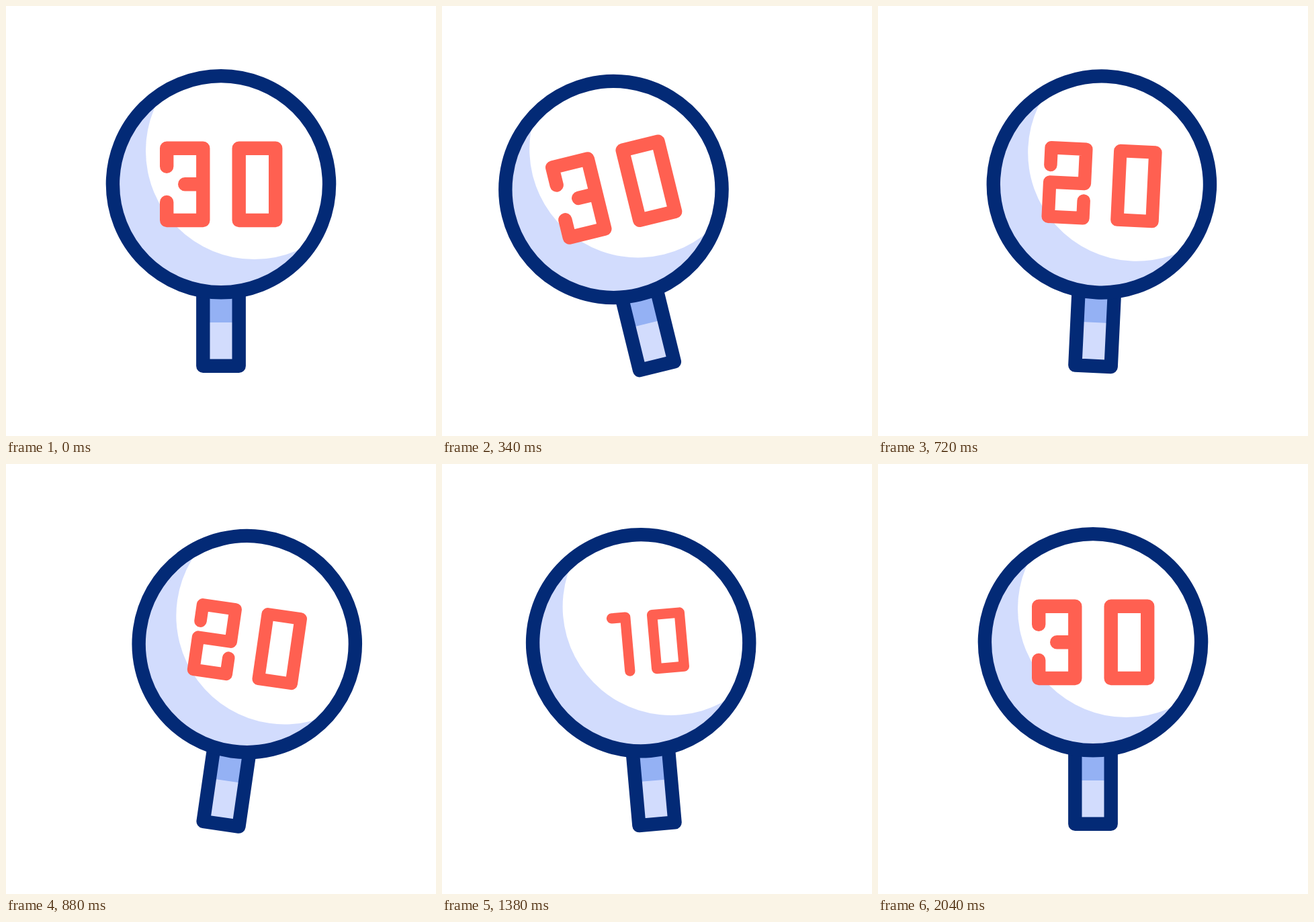
Write an HTML page that moves like this. It is 640 by 640 pixels and loops after 3.02 s.

```html
<!DOCTYPE html>
<html lang="en">
<head>
<meta charset="utf-8">
<title>Countdown paddle</title>
<style>
  html, body { margin: 0; height: 100%; overflow: hidden; background: #fff; }
  svg { display: block; width: 100%; height: 100%; }
  .line { fill: none; stroke-width: 20.4; stroke-linecap: round; stroke-linejoin: round; }
</style>
</head>
<body>
<svg viewBox="0 0 640 640">
  <clipPath id="disc"><circle cx="320" cy="265.2" r="161"/></clipPath>
  <g id="paddle">
    <path fill="#d2dcfd" d="M293.3 420H346.7V535.7H293.3Z"/>
    <path fill="#94b1f4" d="M293.3 420H346.7V471H293.3Z"/>
    <path class="line" stroke="#032a76" d="M293.3 425V535.8H346.7V425"/>
    <circle cx="320" cy="265.2" r="161" fill="#d2dcfd"/>
    <circle cx="369.5" cy="215.5" r="161.5" fill="#fff" clip-path="url(#disc)"/>
    <circle class="line" cx="320" cy="265.2" r="161.1" stroke="#032a76"/>
    <g id="number" class="line" stroke="#ff6051">
      <path id="tens"/>
      <path d="M346.7 211.7H401.2V319H346.7Z"/>
    </g>
  </g>
</svg>
<script>
const LOOP = 3020, STEP = 20;
const [paddle, number, tens] = ['paddle', 'number', 'tens'].map(id => document.getElementById(id));

const ONE = 'M266.2 211.7H293.3V319';
const TWO = 'M239.2 238.7V211.7H293.3V265.3H239.2V319H293.3V292';
const THREE = 'M239.2 238.7V211.7H293.3V319H239.2V292M293.3 265.3H266.2';

// [time, angle, power of the easing that leads there]
const SWING = [
  [0, 0, 1], [400, -14.1, 2.6], [930, 8.3, 3], [1300, -6, 2],
  [1640, 2.6, 2], [1850, -1.1, 2], [2040, 0, 2]
];

const ease = (p, k) => p < .5 ? (2 * p) ** k / 2 : 1 - (2 - 2 * p) ** k / 2;

function angleAt(t) {
  const i = SWING.findIndex(key => key[0] > t);
  if (i < 0) return 0;
  const [t0, a0] = SWING[i - 1], [t1, a1, k] = SWING[i];
  return a0 + (a1 - a0) * ease((t - t0) / (t1 - t0), k);
}

function scaleAt(t) {
  if (t < 400 || t >= 1640) return 1;
  return 1 - .14 * (1 - Math.cos(Math.PI * (t - 400) / 1240));
}

const tensAt = t => t < 560 || t >= 1640 ? THREE : t < 1100 ? TWO : ONE;

const start = performance.now();
function draw() {
  const t = Math.floor((performance.now() - start) % LOOP / STEP) * STEP;
  paddle.setAttribute('transform', `rotate(${angleAt(t)} 320 536)`);
  number.setAttribute('transform', `translate(320 265.3) scale(${scaleAt(t)}) translate(-320 -265.3)`);
  tens.setAttribute('d', tensAt(t));
  requestAnimationFrame(draw);
}
draw();
</script>
</body>
</html>
```
